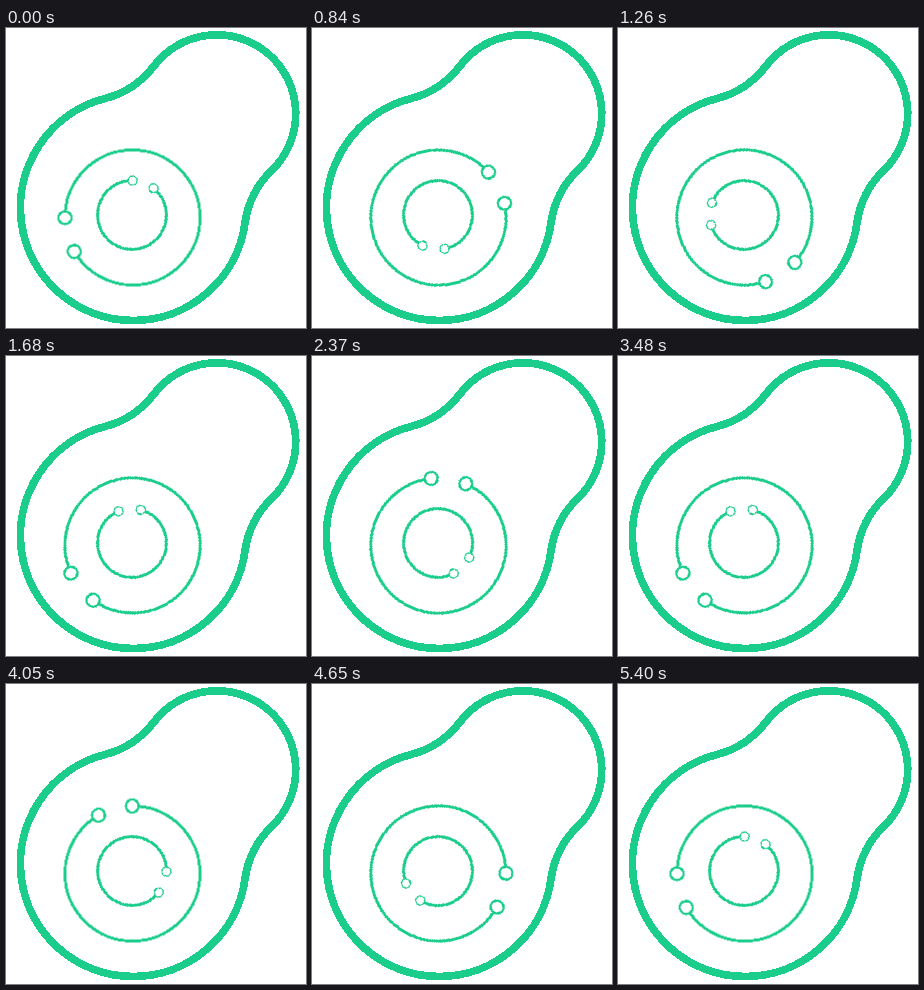
Write an HTML page that moves like this. It is 300 px wide and 300 px high and loops after 5430 ms.

```html
<!DOCTYPE html>
<html lang="en">
<head>
<meta charset="utf-8">
<title>Rotating rings</title>
<style>
  html, body { margin: 0; width: 100%; height: 100%; overflow: hidden; background: #fff; }
  svg { display: block; width: 100vw; height: 100vh; fill: none; stroke: #1acd8b; shape-rendering: crispEdges; }
  .dot { fill: #fff; }
  /* 181 held poses, 6 degrees apart; the last equals the first */
  .spin { transform-origin: 0 0; animation: spin 5430ms steps(181, end) infinite; }
  @keyframes spin {
    from { transform: rotate(0deg); }
    to { transform: rotate(1086deg); }
  }
</style>
</head>
<body>
<svg viewBox="0 0 300 300">
  <path stroke-width="7.7" d="M98.6 70.6 A90 90 0 0 0 147.9 38.05 A78.95 78.95 0 1 1 265.8 142.4 A90 90 0 0 0 239 194.9 A112.8 112.8 0 1 1 98.6 70.6Z"/>

  <g transform="translate(126.5 189.5) rotate(179.8)">
    <g class="spin">
      <circle r="67.5" stroke-width="2.9" pathLength="360" stroke-dasharray="329.9 30.1"/>
      <g class="dot" stroke-width="2.3">
        <circle cx="67.5" r="6.5"/>
        <circle cx="67.5" r="6.5" transform="rotate(-30.1)"/>
      </g>
    </g>
  </g>

  <g transform="translate(126 187) rotate(-51.2)">
    <g class="spin">
      <circle r="34.4" stroke-width="2.9" pathLength="360" stroke-dasharray="322.2 37.8"/>
      <g class="dot" stroke-width="1.4">
        <circle cx="34.4" r="4.5"/>
        <circle cx="34.4" r="4.5" transform="rotate(-37.8)"/>
      </g>
    </g>
  </g>
</svg>
</body>
</html>
```
